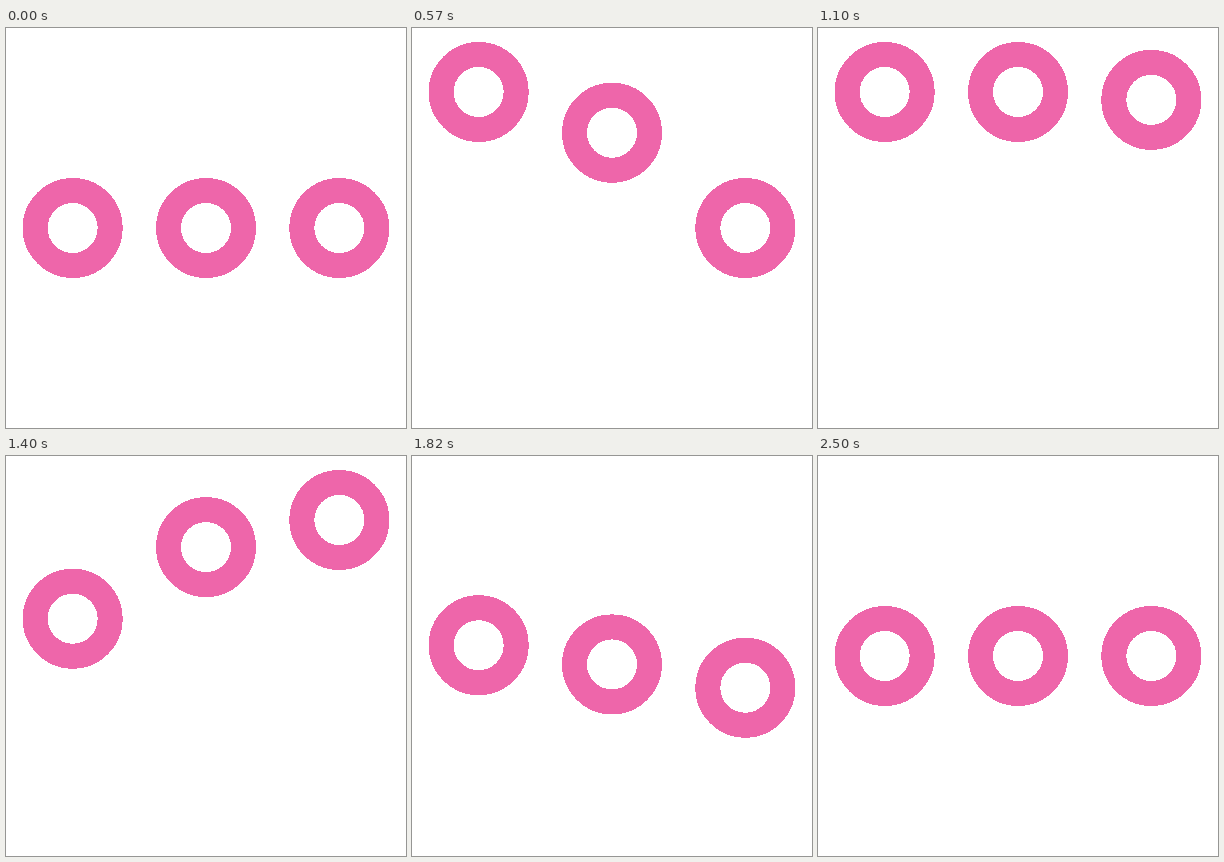
Animation, 400 px wide and 400 px high, one loop 2520 ms. Source, as an HTML page:

```html
<!DOCTYPE html>
<html lang="en">
<head>
<meta charset="utf-8">
<title>Three rings</title>
<style>
  html, body { margin: 0; height: 100%; overflow: hidden; background: #fff; }
  svg { display: block; width: 100%; height: 100%; }
  circle { fill: none; stroke: #e6a; stroke-width: 25; shape-rendering: crispEdges; }
</style>
</head>
<body>
<svg viewBox="0 0 400 400">
  <circle cx="66.67" cy="200" r="37.5"/>
  <circle cx="200" cy="200" r="37.5"/>
  <circle cx="333.33" cy="200" r="37.5"/>
</svg>
<script>
const LOOP = 2520;
const RISE = 407;      // the rings rise one after another
const STAGGER = 106;   // and drop in a quick wave
const rings = document.querySelectorAll('circle');

function bezier(x1, y1, x2, y2) {
  const at = (a, b, s) => 3 * (1 - s) * s * ((1 - s) * a + s * b) + s ** 3;
  return x => {
    if (x <= 0 || x >= 1) return x <= 0 ? 0 : 1;
    let lo = 0, hi = 1;
    for (let i = 0; i < 24; i++) {
      const mid = (lo + hi) / 2;
      if (at(x1, x2, mid) < x) lo = mid; else hi = mid;
    }
    return at(y1, y2, lo);
  };
}

const ease = bezier(0.25, 0.1, 0.25, 1);
const fall = bezier(0.333, 0.033, 0.667, 0.633);
const sway = x => (1 - Math.cos(Math.PI * Math.min(1, Math.max(0, x)))) / 2;

function ringY(i, t) {
  const up = ease((t - i * RISE) / RISE);
  const d = t - i * STAGGER;
  return 200 - 136 * up
    + 178 * fall((d - 1207) / 300)
    - 56 * sway((d - 1507) / 376)
    + 14 * sway((d - 1883) / 409);
}

// The picture advances in 25 ms steps, shown alternately for 20 and 30 ms.
function stepTime(t) {
  return 50 * Math.floor(t / 50) + (t % 50 >= 20 ? 25 : 0);
}

const start = performance.now();
function draw() {
  const t = stepTime((performance.now() - start) % LOOP);
  rings.forEach((ring, i) => ring.setAttribute('cy', ringY(i, t).toFixed(2)));
  requestAnimationFrame(draw);
}
draw();
</script>
</body>
</html>
```
